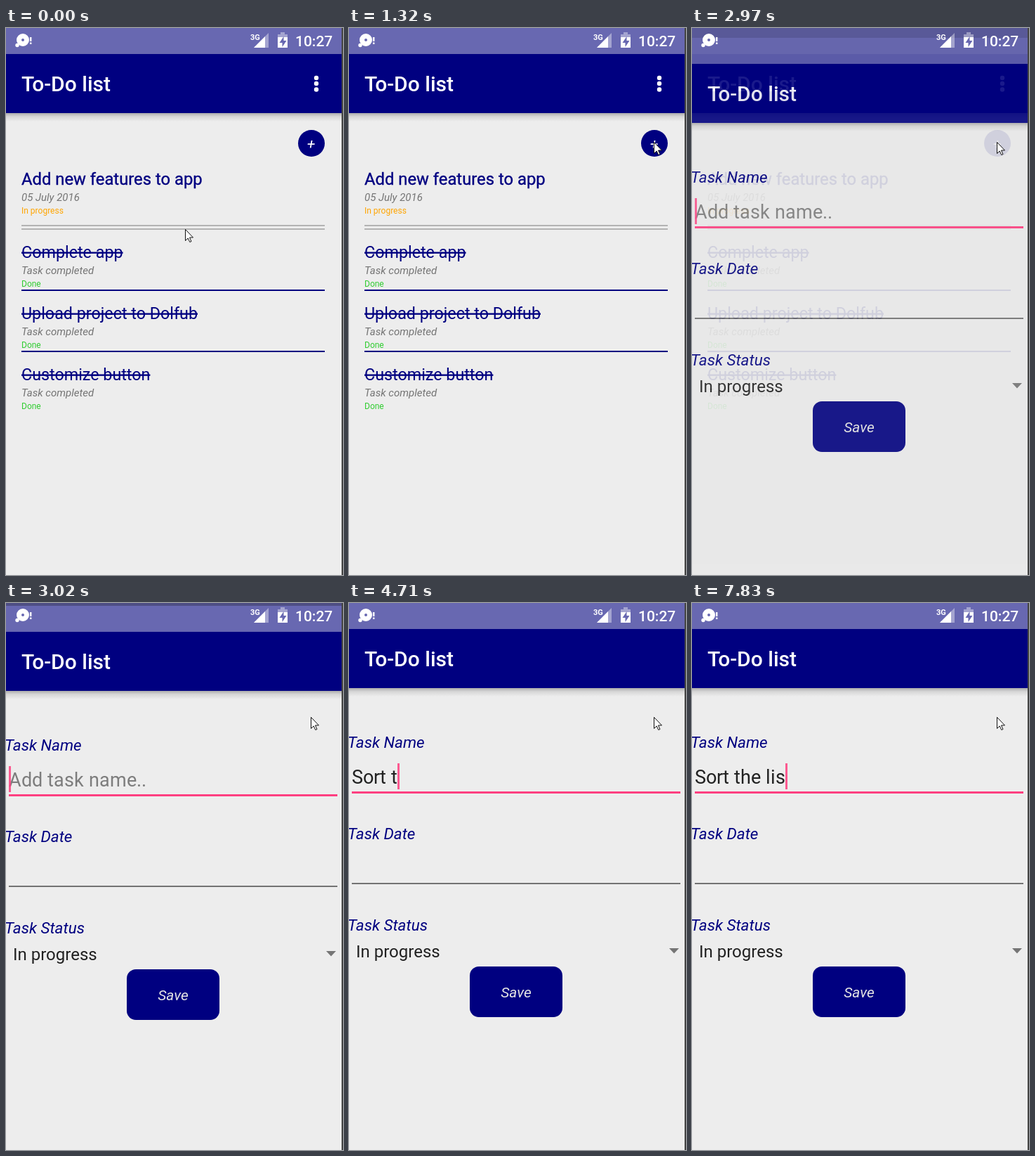
Write an HTML page that moves like this. It is 480 by 778 pixels and loops after 8000 ms.

```html
<!DOCTYPE html>
<html lang="en">
<head>
<meta charset="utf-8">
<title>To-Do list</title>
<style>
  html, body { margin: 0; height: 100%; overflow: hidden; background: #ededed; }
  svg { display: block; width: 100vw; height: 100vh; }
  text { font-family: Roboto, sans-serif; }
  .navy { fill: #000080; }
  .title { font-size: 30px; font-weight: 500; fill: #fff; }
  .task { font-size: 23.3px; fill: #000080; }
  .done { text-decoration: line-through; }
  .new { font-size: 23.8px; stroke: #000080; stroke-width: .35; }
  .date { font-size: 15px; font-style: italic; fill: #757575; }
  .state { font-size: 12px; }
  .label { font-size: 22.5px; font-style: italic; fill: #000080; }
  .input { font-size: 27px; }
  .button { font-size: 21px; font-style: italic; }
</style>
</head>
<body>
<svg viewBox="0 0 480 778" preserveAspectRatio="none">
  <defs>
    <linearGradient id="shade" x2="0" y2="1">
      <stop offset="0" stop-opacity=".28"/>
      <stop offset=".4" stop-opacity=".1"/>
      <stop offset="1" stop-opacity="0"/>
    </linearGradient>
    <g id="frame">
      <rect width="478" height="778" fill="#ededed"/>
      <rect width="478" height="37" fill="#6868b1"/>
      <rect y="37" width="478" height="84" class="navy"/>
      <rect y="121" width="478" height="12" fill="url(#shade)"/>
      <text x="22" y="90" class="title">To-Do list</text>
    </g>
  </defs>
  <rect width="480" height="778"/>

  <g id="list">
    <use href="#frame"/>
    <g fill="#fff">
      <circle cx="442" cy="71" r="3.2"/>
      <circle cx="442" cy="79" r="3.2"/>
      <circle cx="442" cy="87.5" r="3.2"/>
    </g>
    <circle cx="435" cy="164" r="19" class="navy"/>
    <text x="434.5" y="171.5" text-anchor="middle" class="button" fill="#fff">+</text>
    <path d="M22 281H454M22 286H454" stroke="#b3b3b3" stroke-width="2"/>
    <path d="M22 373H454M22 460H454" stroke="#000080" stroke-width="2"/>
    <g id="tasks"></g>
  </g>

  <g id="form">
    <use href="#frame"/>
    <text x="-2" y="206" class="label">Task Name</text>
    <text x="-2" y="336" class="label">Task Date</text>
    <text x="-2" y="466" class="label">Task Status</text>
    <text id="input" y="257" class="input"></text>
    <rect id="caret" y="228" width="3" height="37" fill="#ff4081" opacity=".85"/>
    <rect x="4" y="268" width="468" height="3" fill="#ff4081"/>
    <rect x="4" y="398" width="468" height="2" fill="#737373"/>
    <text x="10" y="504" font-size="24" fill="#212121">In progress</text>
    <path d="M456 491h14l-7 7.5z" fill="#757575"/>
    <rect x="172" y="517" width="132" height="72" rx="13" class="navy"/>
    <text x="238" y="561" text-anchor="middle" class="button" fill="#e4e4e4">Save</text>
  </g>

  <g fill="#fff">
    <path fill-rule="evenodd" d="M15 17a9 9 0 1 0 18 0a9 9 0 1 0-18 0M22 17a2 2 0 1 0 4 0a2 2 0 1 0-4 0"/>
    <circle cx="16" cy="24.5" r="2.7"/>
    <path d="M34 13h2.4v6h-2.4zM34 20.5h2.4v2.4h-2.4z"/>
    <text x="348" y="16.5" font-size="11" font-weight="700" textLength="">3G</text>
    <path d="M353 28L374 7V28Z" opacity=".4"/>
    <path d="M353 28L369 12V28Z"/>
    <path d="M387 13V9h4V6h6v3h4v4z" opacity=".4"/>
    <path d="M387 13h14v15h-14z"/>
    <path d="M395.500 12l-6 9h4v6l6-9h-4z" fill="#6868b1"/>
    <text x="412" y="26" font-size="21" font-weight="500">10:27</text>
  </g>
  <rect x="478" width="2" height="778" fill="#444"/>
  <path id="pointer" d="M.5.5V16.500L4.200 13 6.800 18.500 9 17.500 6.500 12H11.500Z" fill="#fff" stroke="#111"/>
</svg>
<script>
const $ = id => document.getElementById(id);
const LOOP = 8000, HINT = "Add task name..";

const tasks = [
  [223, "Add new features to app", "05 July 2016", "In progress"],
  [327, "Complete app"],
  [414, "Upload project to Dolfub"],
  [501, "Customize button"]
];
$("tasks").innerHTML = tasks.map(([y, name, date, state]) => `
  <text x="22" y="${y}" class="task ${date ? "new" : "done"}">${name}</text>
  <text x="22" y="${y + 23}" class="date">${date || "Task completed"}</text>
  <text x="22" y="${y + 41}" class="state" fill="${state ? "#ffa500" : "#32cd32"}">${state || "Done"}</text>`).join("");

// [time, value] lists; the last entry already reached holds
const typing = [
  [0, ""], [3980, "S"], [4290, "So"], [4395, "Sor"], [4500, "Sort"], [4605, "Sort "],
  [4710, "Sort t"], [4890, "Sort th"], [5080, "Sort thr"], [5690, "Sort th"],
  [5880, "Sort the"], [5940, "Sort the "], [7030, "Sort the l"], [7120, "Sort the li"],
  [7220, "Sort the lis"], [7530, "Sort the liss"], [7830, "Sort the lis"]
];
const blink = [[0, 1], [3430, 0], [3920, 1], [5570, 0], [5690, 1], [6430, 0], [6930, 1]];
const slide = [
  [0, { y: 0, show: 0, dim: 1 }],
  [2920, { y: 38, show: .55, dim: .97 }],
  [2970, { y: 14, show: .88, dim: .86 }],
  [3020, { y: 4, show: 1, dim: .75 }],
  [3070, { y: 1, show: 1, dim: .7 }],
  [3120, { y: 0, show: 1, dim: .7 }]
];
const at = (list, t) => list.findLast(e => e[0] <= t)[1];

// Whole-pixel letter advances, as on the device
const pen = document.createElement("canvas").getContext("2d");
function stops(text) {
  pen.font = "27px Roboto, sans-serif";
  const xs = [4];
  for (const c of text) xs.push(xs.at(-1) + Math.round(pen.measureText(c).width));
  return xs;
}

function drawInput(t) {
  const value = at(typing, t), shown = value || HINT;
  $("input").textContent = shown;
  $("input").setAttribute("x", stops(shown).join(" "));
  $("input").setAttribute("fill", value ? "#212121" : "#7d7d7d");
  $("caret").setAttribute("x", stops(value).at(-1));
  $("caret").setAttribute("visibility", at(blink, t) ? "visible" : "hidden");
}

function drawPointer(t) {
  const steps = t < 500 ? 0 : Math.min(14, Math.floor((t - 500) / (750 / 13) + 1e-6) + 1);
  const p = steps / 14, k = p * p * (3 - 2 * p);
  const x = t < 1320 ? Math.round(255 + 178 * k) : 434;
  $("pointer").setAttribute("transform", `translate(${x} ${Math.round(286 - 124 * k)})`);
}

function draw(t) {
  const { y, show, dim } = at(slide, t);
  $("list").setAttribute("opacity", dim);
  $("form").setAttribute("opacity", show);
  $("form").setAttribute("transform", `translate(0 ${y})`);
  drawInput(t);
  drawPointer(t);
}

const start = performance.now();
function tick(now) {
  draw(Math.max(0, now - start) % LOOP);
  requestAnimationFrame(tick);
}
draw(0);
requestAnimationFrame(tick);
</script>
</body>
</html>
```
